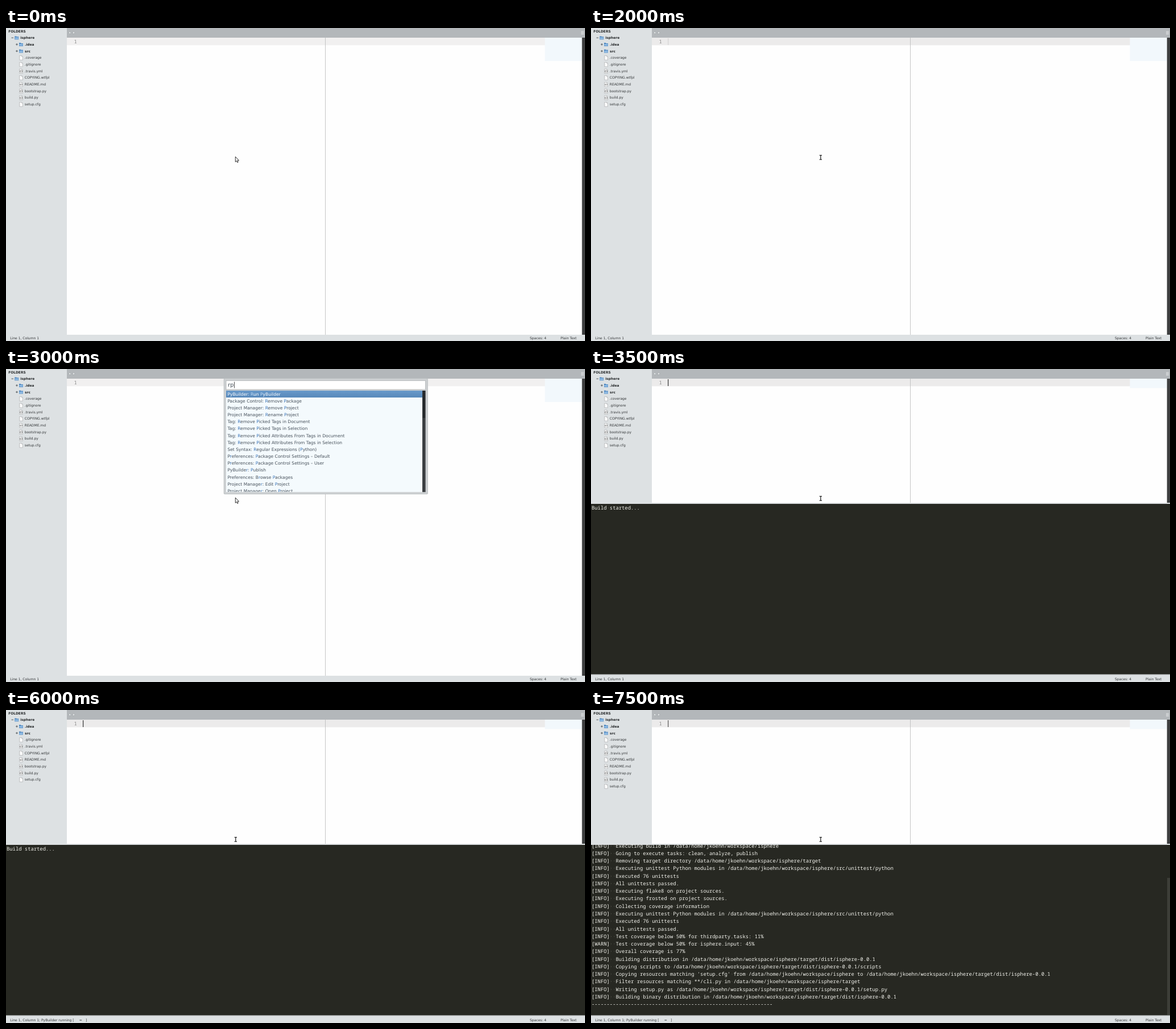
Recreate the animation shown at these times as an HTML page. Size 1018 by 550 pixels, loop 8 s.

```html
<!DOCTYPE html>
<html lang="en">
<head>
<meta charset="utf-8">
<title>Build run in an editor</title>
<style>
  html, body { margin: 0; width: 100%; height: 100%; overflow: hidden; background: #fefefe; }
  svg { display: block; width: 1018px; height: 550px; }
  text { font: 6px "DejaVu Sans", sans-serif; fill: #35383a; white-space: pre; text-rendering: geometricPrecision; }
  .bold { font-weight: bold; font-size: 5.9px; fill: #26292b; }
  .mono { font: 8.85px "Noto Sans Mono", "DejaVu Sans Mono", monospace; }
  .log { fill: #f4f4ee; }
  .dot { fill: #62645a; }
  .item { font-size: 7.57px; fill: #46505a; }
  .item tspan { fill: #3873b8; }
  .picked { fill: #fff; }
  .picked tspan { fill: #c3def8; }
  .query { font-size: 9.6px; fill: #3c4650; }
</style>
</head>
<body>
<svg viewBox="0 0 1018 550">
  <defs>
    <linearGradient id="blue" x2="0" y2="1">
      <stop stop-color="#6899ca"/><stop offset="1" stop-color="#5788ba"/>
    </linearGradient>
    <clipPath id="logClip"><rect y="237" width="1013" height="299"/></clipPath>
    <clipPath id="listClip"><rect x="387" y="38" width="345" height="178"/></clipPath>
    <g id="folder">
      <path d="M0 1.2h2.8l.8.8h3.4v5h-7z" fill="#4a83bd"/>
      <path d="M.4 3h6.2v3.5h-6.2z" fill="#8db9e2"/>
    </g>
    <g id="page">
      <path d="M.8.4h3.9l1.7 1.7v5.9h-5.6z" fill="#fafafa" stroke="#9a9d9f" stroke-width=".55"/>
      <path d="M4.7.4v1.7h1.7" fill="none" stroke="#9a9d9f" stroke-width=".45"/>
    </g>
    <path id="brace" d="M3 2.8q-.8 0-.8.8t-.6.9q.6.1.6.9t.8.8M4.2 2.8q.8 0 .8.8t.6.9q-.6.1-.6.9t-.8.8" fill="none" stroke="#333" stroke-width=".75"/>
    <path id="angle" d="M3 3.3l-1.3 1.2 1.3 1.2M4.2 3.3l1.3 1.2-1.3 1.2" fill="none" stroke="#333" stroke-width=".85"/>
  </defs>

  <rect width="1018" height="550" fill="#fefefe"/>
  <rect id="line" x="107" y="17" width="841" height="13.3"/>
  <rect id="map" x="947.5" y="17" width="65" fill="#f2f8fc"/>
  <path d="M561.5 17V539" stroke="#bfbfbf" stroke-width=".9"/>
  <text class="mono" x="119.5" y="27.2" style="fill:#8b8b8b">1</text>
  <rect id="caret" x="135.2" y="18" width="1" height="12" fill="#111"/>
  <rect x="1012.7" y="17" width="5.3" height="522" fill="#3e3f40"/>

  <rect x="106" width="912" height="17" fill="#b3b7ba"/>
  <path d="M113.4 5.8v5l-3.4-2.5zM117.8 5.8v5l3.4-2.5z" fill="#eef0f1" stroke="#8f9497" stroke-width=".5"/>
  <path d="M1011 6.3h5M1011 8.5h5M1011 10.7h5" stroke="#e4e6e7" stroke-width="1"/>

  <rect width="107" height="550" fill="#dde1e3"/>
  <g id="tree"></g>

  <g id="panel">
    <rect y="235" width="1018" height="304" fill="#dcdfe1"/>
    <rect y="237" width="1018" height="299.5" fill="#272822"/>
    <path d="M0 537.5H1018" stroke="#c5c9cb" stroke-width=".8"/>
    <rect id="thumb" x="1013" y="295" width="5" height="241" fill="#3d3e38"/>
    <g clip-path="url(#logClip)"><g id="log"></g></g>
  </g>

  <rect y="539" width="1018" height="11" fill="#dde1e3"/>
  <text x="7.3" y="547">Line 1, Column 1<tspan id="running">; PyBuilder running [</tspan></text>
  <text id="spin" y="547">=</text>
  <text id="close" x="140" y="547">]</text>
  <text x="921" y="547">Spaces: 4</text>
  <text x="975" y="547">Plain Text</text>

  <g id="palette">
    <rect x="382.7" y="16.5" width="359.2" height="203.7" rx="2" fill="#c2c6c8"/>
    <rect x="384" y="17" width="356.5" height="202" rx="1.5" fill="#cdd0d2"/>
    <rect x="387" y="20.4" width="350.5" height="15.6" fill="#fff" stroke="#a9adb0" stroke-width=".7"/>
    <text id="query" class="query" x="390.3" y="31.3"></text>
    <rect id="mark" y="22.5" width=".8" height="11" fill="#222"/>
    <rect x="387" y="38" width="345" height="178.2" fill="#f4fafd"/>
    <rect x="387" y="38" width="345" height="12.1" fill="url(#blue)"/>
    <rect x="732" y="38" width="5.6" height="178.2" fill="#3b3e41"/>
    <rect x="732.5" y="38" width="4.6" height="48" fill="#26292c"/>
    <g id="items" clip-path="url(#listClip)"></g>
  </g>

  <path id="arrow" d="M403.3 226v9.3l2.1-1.9 1.3 3 1.5-.7-1.3-2.9h2.6z" fill="#fff" stroke="#1c1c1c" stroke-width=".9"/>
  <g id="beam" fill="none">
    <path d="M401.8 223.5h4M401.8 231.2h4M403.8 223.5v7.7" stroke="#fff" stroke-width="2.4"/>
    <path d="M401.6 223.6h4.4M401.6 231.1h4.4M403.8 223.6v7.5" stroke="#2b2b2b" stroke-width="1.3"/>
  </g>
</svg>

<script>
const $ = id => document.getElementById(id);
const show = (id, on) => $(id).setAttribute('visibility', on ? 'visible' : 'hidden');
const set = (id, name, value) => $(id).setAttribute(name, value);

const STEP = 500, LOOP = 8000;

// Sidebar
const PITCH = 11.68;
const FILES = [
  ['.coverage'], ['.gitignore'], ['.travis.yml', 'brace'], ['COPYING.wtfpl'],
  ['README.md', 'angle'], ['bootstrap.py', 'brace'], ['build.py', 'brace'], ['setup.cfg']
];

const folderRow = (x, y, name, open) => `
  <path d="M${x - 5.8} ${y}h3.6${open ? '' : `M${x - 4} ${y - 1.8}v3.6`}" stroke="#555a5d" stroke-width="1"/>
  <use href="#folder" x="${x}" y="${y - 4}"/>
  <text class="bold" x="${x + 10}" y="${y + 2.1}">${name}</text>`;

const fileRow = ([name, glyph], y) => `
  <use href="#page" x="23" y="${y - 4}"/>
  ${glyph ? `<use href="#${glyph}" x="23" y="${y - 4}"/>` : ''}
  <text x="32.8" y="${y + 2.1}">${name}</text>`;

function drawTree(files, shift) {
  const top = 17.2;
  $('tree').innerHTML = '<text class="bold" x="4.2" y="8.2">FOLDERS</text>' +
    folderRow(15.3, top, 'isphere', true) +
    folderRow(23, top + PITCH, '.idea') +
    folderRow(23, top + 2 * PITCH, 'src') +
    files.map((f, i) => fileRow(f, top + (i + 3) * PITCH + shift)).join('');
}

// Build log
const HOME = '/data/home/jkoehn/workspace/isphere';
const DIST = HOME + '/target/dist/isphere-0.0.1';
const RULE = '-'.repeat(60);
const info = s => '[INFO]  ' + s;
const tests = [
  `Executing unittest Python modules in ${HOME}/src/unittest/python`,
  'Executed 76 unittests', 'All unittests passed.'
].map(info);
const LOG = [
  'Build started...', 'PyBuilder version 0.10.39', 'Build started at 2015-02-06 12:04:03', RULE,
  ...[
    'Building isphere version 0.0.1',
    `Executing build in ${HOME}`,
    'Going to execute tasks: clean, analyze, publish',
    `Removing target directory ${HOME}/target`
  ].map(info),
  ...tests,
  ...['Executing flake8 on project sources.', 'Executing frosted on project sources.',
    'Collecting coverage information'].map(info),
  ...tests,
  info('Test coverage below 50% for thirdparty.tasks: 11%'),
  '[WARN]  Test coverage below 50% for isphere.input: 45%',
  ...[
    'Overall coverage is 77%',
    `Building distribution in ${DIST}`,
    `Copying scripts to ${DIST}/scripts`,
    `Copying resources matching 'setup.cfg' from ${HOME} to ${DIST}`,
    `Filter resources matching **/cli.py in ${HOME}/target`,
    `Writing setup.py as ${DIST}/setup.py`,
    `Building binary distribution in ${DIST}`
  ].map(info),
  RULE
];

function drawLog(count, scroll) {
  $('log').innerHTML = LOG.slice(0, count).map((s, i) =>
    `<text class="mono log" x="1" y="${246.9 + i * 13.27 - scroll}">` +
    s.replace(/ +/g, m => `<tspan class="dot">${'·'.repeat(m.length)}</tspan>`) + '</text>').join('');
}

// Command palette: "_" precedes a matched letter, "|" a shortcut
const ALL = [
  'PyBuilder: Run PyBuilder', 'Bookmarks: Clear All', 'Bookmarks: Select All', 'Build: New Build System',
  'Code Folding: Fold All', 'Code Folding: Unfold All|Ctrl+K, Ctrl+J', 'Convert Case: Lower Case|Ctrl+K, Ctrl+L',
  'Convert Case: Swap Case', 'Convert Case: Title Case', 'Convert Case: Upper Case|Ctrl+K, Ctrl+U',
  'File: Close All', 'File: New View into File', 'File: Revert', 'File: Save All',
  'HTML: Encode Special Characters'
];
const FOUND = [
  'PyBuilder: _Run _PyBuilder', 'Package Control: _Remove _Package', 'Project Manager: _Remove _Project',
  'Project Manager: _Rename _Project', 'Tag: _Remove _Picked Tags in Document',
  'Tag: _Remove _Picked Tags in Selection', 'Tag: _Remove _Picked Attributes From Tags in Document',
  'Tag: _Remove _Picked Attributes From Tags in Selection', 'Set Syntax: _Regular Expressions (_Python)',
  'P_references: _Package Control Settings – Default', 'P_references: _Package Control Settings – User',
  'PyBuilde_r: _Publish', 'Preferences: B_rowse _Packages', 'Project Manage_r: Edit _Project',
  'Project Manage_r: Open _Project'
];

function drawPalette(query, list) {
  $('query').textContent = query;
  set('mark', 'x', query ? 401 : 390.5);
  $('items').innerHTML = list.map((row, i) => {
    const [name, keys] = row.split('|'), y = 46.5 + i * 12.18;
    return `<text class="item${i ? '' : ' picked'}" x="389.4" y="${y}">` +
      name.replace(/_(.)/g, '<tspan>$1</tspan>') + '</text>' +
      (keys ? `<text class="item" x="730" y="${y}" text-anchor="end">${keys}</text>` : '');
  }).join('');
}

// One entry per step
const CARET = [0, 1, .12, 1, .12, 0, 0, 1, 0, 0, 1, .12, 1, .12, .8, .8];
const SPIN = [4, 5, 4, 5, 4, 5, 6, 4];

function draw(step) {
  const palette = step === 5 || step === 6;
  const pointer = step === 0 || palette;
  const panel = step >= 7, running = step >= 8;
  const cleaned = step >= 10 && step < 14;

  set('line', 'fill', pointer ? '#f1f0f0' : '#ecebeb');
  set('map', 'height', panel ? 16.5 : 41);
  set('caret', 'opacity', CARET[step]);
  show('arrow', pointer);
  show('beam', !pointer);
  show('palette', palette);
  show('panel', panel);
  show('thumb', step === 15);
  show('running', running);
  show('spin', running);
  show('close', running);
  if (running) set('spin', 'x', 120.3 + SPIN[step - 8] * 2.12);

  drawTree(cleaned ? FILES.slice(1) : FILES, step === 10 ? 2 : 0);
  if (palette) drawPalette(step === 6 ? 'rp' : '', step === 6 ? FOUND : ALL);
  drawLog(step < 7 ? 0 : step < 13 ? 1 : step < 14 ? 8 : step < 15 ? 17 : LOG.length, step === 15 ? 71.7 : 0);
}

let last = -1;
const start = performance.now();
function tick() {
  const step = Math.floor((performance.now() - start) % LOOP / STEP);
  if (step !== last) draw(last = step);
  requestAnimationFrame(tick);
}
tick();
</script>
</body>
</html>
```
